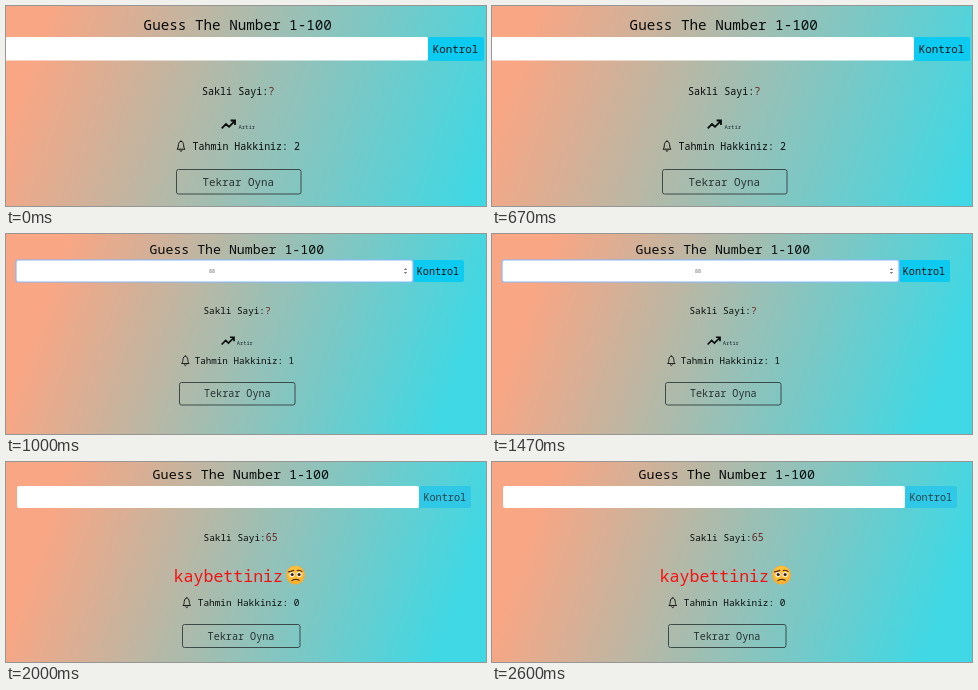
An HTML page for the animation above (2.99 s loop, 480 by 200 pixels).

```html
<!DOCTYPE html>
<html lang="tr">
<head>
<meta charset="utf-8">
<title>Guess The Number</title>
<style>
  html, body { margin: 0; width: 100%; height: 100%; overflow: hidden; }
  .scene { position: absolute; inset: 0; width: 480px; height: 200px; visibility: hidden; }
  svg { display: block; }
  text { font-family: "Noto Sans Mono", "DejaVu Sans Mono", monospace; white-space: pre; }
</style>
</head>
<body>
<script>
const LOOP = 2990;
const ADVANCE = 0.6; // glyph width of the monospace face, in em

// Text runs are [x, baseline, glyph step]; boxes are [x, y, width, height].
const scenes = [
  {
    start: 0, stops: [8, 97],
    title: [137.6, 24, 8.56],
    input: [-4, 31, 426, 23.5], check: [422, 31, 56, 24], checkText: [426.8, 47, 6.5],
    secret: [196, 89, 6.03], value: '?',
    trend: [215, 113.5, 1], hint: [232.5, 123, 3.3],
    bell: [170, 134, 1], lives: [186.6, 143.6, 5.97], left: 2,
    again: [170.5, 163.5, 124.5, 24.5], againText: [196.6, 179.6, 6.5]
  },
  {
    start: 1000, stops: [11.2, 91.1],
    title: [143.6, 19.6, 7.94],
    input: [10, 26, 397, 22], focus: true, check: [407, 26, 51, 22], checkText: [410.8, 40.8, 6.05],
    secret: [197.5, 79.8, 5.58], value: '?',
    trend: [215, 102.3, 0.93], hint: [230.8, 111, 3.2],
    bell: [174.7, 121, 0.93], lives: [188.8, 130, 5.52], left: 1,
    again: [173.5, 148.5, 115.5, 22.5], againText: [198, 163.4, 6.05]
  },
  {
    start: 2000, stops: [11.2, 91.1],
    title: [146.6, 17.4, 8.03],
    input: [11, 24, 402, 22], check: [413, 24, 52, 22], checkText: [417.4, 38.6, 6.12], over: true,
    secret: [197.5, 78.6, 5.66], value: '65',
    lost: [167.6, 120, 9.95], face: [289.5, 113],
    bell: [176, 134.8, 0.95], lives: [191.8, 144, 5.65], left: 0,
    again: [176.5, 162.5, 117.5, 23], againText: [201.6, 178, 6.08]
  }
];

const label = ([x, y, step], str, fill = '#080c0c') =>
  `<text x="${x}" y="${y}" font-size="${(step / ADVANCE).toFixed(2)}" fill="${fill}">${str}</text>`;

const box = ([x, y, w, h], attrs) =>
  `<rect x="${x}" y="${y}" width="${w}" height="${h}" rx="2" ${attrs}/>`;

const place = ([x, y, k = 1], body) =>
  `<g transform="translate(${x} ${y}) scale(${k})">${body}</g>`;

const bell = `<path d="M1 9.2C2.3 8 2.2 6.5 2.4 4.7 2.6 2.7 3.6 1.4 5 1.4S7.4 2.7 7.6 4.7C7.8 6.5 7.7 8 9 9.2Z"
  fill="none" stroke="#111" stroke-linejoin="round"/><path d="M5 .3V1.5M3.6 10.3Q5 12.4 6.4 10.3" fill="none" stroke="#111"/>`;

const trend = `<path d="M.7 8.8 5 4.5 8 7.3 13.4 1.8M9.6 1H14V5.4" fill="none" stroke="#080c0c" stroke-width="1.8"/>`;

const face = `<circle r="9.4" fill="#fbad2d"/><circle cy="-1" r="8" fill="#fdbf3c"/>
  <circle cx="-3.5" cy="-.6" r="2.5" fill="#fff"/><circle cx="3.6" cy="-.6" r="2.5" fill="#fff"/>
  <circle cx="-3.3" cy="-.5" r="1.6" fill="#332218"/><circle cx="3.6" cy="-.5" r="1.6" fill="#332218"/>
  <path d="M-7-3.2Q-4.4-3.4-1.8-4.6M1.8-4.4Q4-5.4 6.4-3.6M-3.6 5.6Q0 3.2 3.8 5.2"
  fill="none" stroke="#5a3014" stroke-width="1.2" stroke-linecap="round"/>`;

function focusParts([x, y, w, h]) {
  const cx = x + w - 7.5, cy = y + h / 2;
  return box([x, y, w, h], 'fill="none" stroke="#86b7fe" stroke-width="1.2"') +
    label([x + 193, cy + 1.8, 3], '88', '#666') +
    `<path d="M${cx - 1.7} ${cy - 1}l1.7-2 1.7 2zM${cx - 1.7} ${cy + 1}l1.7 2 1.7-2z" fill="#777"/>`;
}

function build(s) {
  const el = document.createElement('div');
  el.className = 'scene';
  el.style.background =
    `linear-gradient(109.6deg, #f9a684 ${s.stops[0]}%, #3fd8e4 ${s.stops[1]}%)`;
  const [sx, sy, step] = s.secret;
  const middle = s.lost
    ? label(s.lost, 'kaybettiniz', '#f31212') + place(s.face, face)
    : place(s.trend, trend) + label(s.hint, 'Artir', '#1c2b36');
  el.innerHTML = `<svg width="480" height="200" viewBox="0 0 480 200">` +
    label(s.title, 'Guess The Number 1-100') +
    box(s.input, 'fill="#fff"') +
    box(s.check, `fill="${s.over ? '#2fc8e6' : '#0dcaf0'}"`) +
    (s.focus ? focusParts(s.input) : '') +
    label(s.checkText, 'Kontrol', s.over ? '#26444c' : '#06181c') +
    label(s.secret, 'Sakli Sayi:') +
    label([sx + 11 * step, sy, step * 1.05], s.value, '#642626') +
    middle +
    place(s.bell, bell) +
    label(s.lives, 'Tahmin Hakkiniz: ' + s.left) +
    box(s.again, 'fill="none" stroke="#3c4a4a"') +
    label(s.againText, 'Tekrar Oyna', '#273232') +
    `</svg>`;
  document.body.append(el);
  return el;
}

const views = scenes.map(build);
const begin = performance.now();

function draw() {
  const t = Math.max(0, performance.now() - begin) % LOOP;
  const current = scenes.filter(s => s.start <= t).length - 1;
  views.forEach((v, i) => { v.style.visibility = i === current ? 'visible' : 'hidden'; });
  requestAnimationFrame(draw);
}
draw();
</script>
</body>
</html>
```
